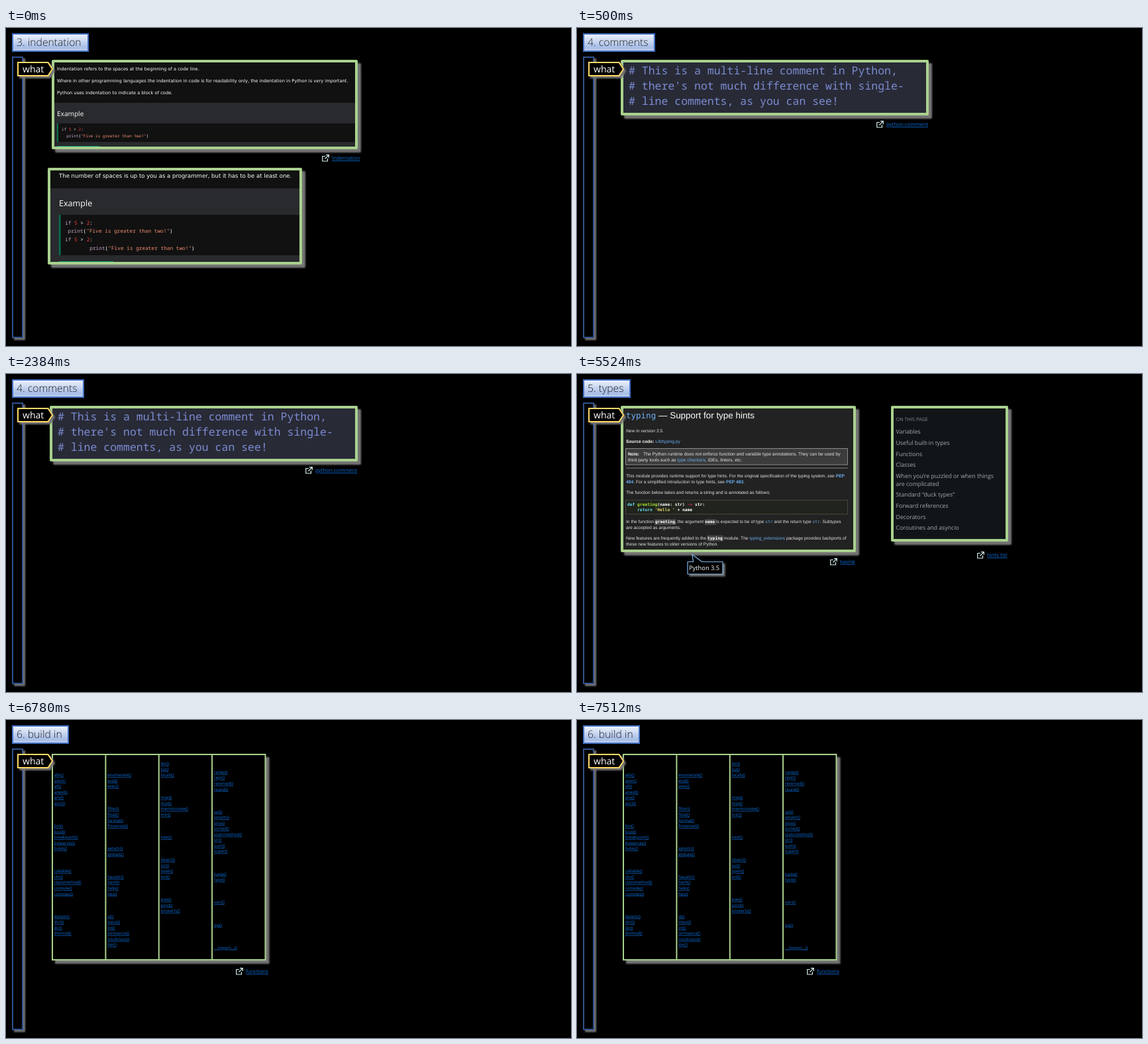
These frames come from a looping animation (853 px wide and 480 px high, 8000 ms). An HTML page:

```html
<!DOCTYPE html>
<html lang="en">
<head>
<meta charset="utf-8">
<style>
html, body { margin: 0; width: 100%; height: 100%; overflow: hidden; background: #000; }
svg { display: block; width: 853px; height: 480px; text-rendering: geometricPrecision; }
.ui { font-family: "Open Sans", "Noto Sans", sans-serif; }
.light { font-family: "Open Sans", "Noto Sans", sans-serif; font-weight: 300; }
.wide { font-family: "DejaVu Sans", sans-serif; }
.doc { font-family: "Liberation Sans", sans-serif; }
.mono { font-family: "Noto Sans Mono", monospace; }
.code { font-family: "DejaVu Sans Mono", monospace; }
.link { fill: #0a6fdc; text-decoration: underline; }
.deep { filter: drop-shadow(5.5px 5.5px 1.3px #747474); }
.near { filter: drop-shadow(3.5px 3.5px 1px #747474); }
</style>
</head>
<body>
<svg viewBox="0 0 853 480">
  <defs>
    <linearGradient id="sky" x2="0" y2="1">
      <stop stop-color="#f0f4fc"/>
      <stop offset=".74" stop-color="#abc0e8"/>
      <stop offset=".83" stop-color="#abc0e8"/>
      <stop offset="1" stop-color="#c7d5ed"/>
    </linearGradient>
  </defs>
  <rect class="near" x="10" y="44" width="15" height="423" stroke="#2f528f" stroke-width="2"/>
  <g id="slides"></g>
  <path class="near" d="M18 52H63.5L70 62 63.5 72H18Z" stroke="#ffd966" stroke-width="2"/>
  <text class="ui" x="25" y="67" font-size="14" fill="#fff">what</text>
</svg>
<script>
const GREEN = '#a9d18e', BLUE = '#6ab0f3';

const text = (font, size, x, y, content, fill = '#fff', extra = '') =>
  `<text class="${font}" font-size="${size}" x="${x}" y="${y}" fill="${fill}" ${extra}>${content}</text>`;
const span = (fill, content, extra = '') => `<tspan fill="${fill}" ${extra}>${content}</tspan>`;
const box = (x1, y1, x2, y2, fill, extra = '') =>
  `<rect x="${x1}" y="${y1}" width="${x2 - x1}" height="${y2 - y1}" fill="${fill}" ${extra}/>`;
// Dark card with a thick green frame; bounds are the outer edges.
const card = (x1, y1, x2, y2, fill) =>
  box(x1 + 2, y1 + 2, x2 - 2, y2 - 2, fill,
    `class="deep" stroke="${GREEN}" stroke-width="4" stroke-linejoin="round"`);
const title = (right, content) =>
  box(10, 9, right - 1, 35, 'url(#sky)', 'stroke="#4472c4" stroke-width="2"') +
  text('light', 15.7, 16, 27, content, '#222');
const link = (x, y, content) =>
  `<path transform="translate(${x - 15} ${y - 8})" d="M5 2.5H.8V10H8.500V6M6 .7H10.300V5M10.300 .7 4.500 6.500"
    fill="none" stroke="#d8f0f0" stroke-width="1.2"/>` + text('ui link', 7.8, x, y, content, '#0a6fdc');

function indentationSlide() {
  const test = span('#c5a5c5', 'if') + span('#ff3838', ' 5') + ' &gt; ' + span('#ff3838', '2') + ':';
  const print = span('#c5a5c5', 'print') + '(' + span('#f08d70', '"Five is greater than two!"') + ')';
  const mono = (size, x, y, content) => text('mono', size, x, y, content);
  const prose = (y, content) => text('wide', 6.72, 77, y, content);
  return title(125, '3. indentation') +
    card(69, 48, 531, 183, '#111') +
    box(73, 113, 527, 179, '#282a2d') +
    box(77, 144, 527, 172, '#111') + box(77, 144, 79, 172, '#08704c') +
    box(77, 178, 141, 179, '#08906c') +
    prose(64, 'Indentation refers to the spaces at the beginning of a code line.') +
    prose(82, 'Where in other programming languages the indentation in code is for readability only, ' +
      'the indentation in Python is very important.') +
    prose(100, 'Python uses indentation to indicate a block of code.') +
    text('ui', 10.1, 77, 133, 'Example') +
    mono(6.08, 84, 154.5, test) + mono(6.08, 91.3, 164.7, print) +
    link(492, 199, 'Indentation') +
    card(63, 211, 447, 357, '#111') +
    box(67, 242, 443, 353, '#282a2d') +
    box(80, 282, 443, 343, '#111') + box(80, 282, 82.5, 343, '#08704c') +
    box(80, 352, 162, 353, '#08906c') +
    text('wide', 8.56, 80, 225.7, 'The number of spaces is up to you as a programmer, but it has to be at least one.') +
    text('ui', 12.6, 80, 269, 'Example') +
    mono(7.77, 89, 296.5, test) + mono(7.77, 93.3, 309.3, print) +
    mono(7.77, 89, 322, test) + mono(7.77, 126.3, 334.7, print);
}

function commentsSlide() {
  const lines = ['This is a multi-line comment in Python,',
    "there's not much difference with single-", 'line comments, as you can see!'];
  return title(118, '4. comments') +
    card(66, 48, 531, 132, '#282a36') +
    lines.map((line, i) => text('mono', 16.5, 78, 70.3 + i * 22.8, '# ' + line, '#7b8bd0')).join('') +
    link(467, 148, 'python-comment');
}

function typesSlide() {
  const doc = (y, content, x = 74, size = 6.7, extra = '') => text('doc', size, x, y, content, '#e4e4e4', extra);
  const bold = content => span('#fff', content, 'font-weight="700"');
  const blue = (content, weight = 400) => span(BLUE, content, `font-weight="${weight}"`);
  const inline = (content, fill = '#fff', weight = 700) =>
    span(fill, content, `class="code" font-size="6.27" font-weight="${weight}"`);
  const toc = [[90, 'Variables'], [107, 'Useful built-in types'], [123.5, 'Functions'], [140, 'Classes'],
    [157, 'When you’re puzzled or when things'], [168.5, 'are complicated'], [185, 'Standard “duck types”'],
    [202, 'Forward references'], [219, 'Decorators'], [235.3, 'Coroutines and asyncio']];
  const code = (x, y, content) => text('code', 6.27, x, y, content, '#fff', 'font-weight="700"');
  return title(81, '5. types') +
    card(66, 48, 421, 269, '#222') +
    text('code', 12.5, 74, 67, 'typing', BLUE) +
    text('doc', 13.45, 123, 67, '— Support for type hints') +
    doc(87.5, 'New in version 3.5.', 74, 6.7, 'font-style="italic"') +
    doc(103.5, bold('Source code:') + ' ' + blue('Lib/typing.py')) +
    box(73.5, 112.5, 408.5, 137, '#3c3c3c', 'stroke="#8a8a8a"') +
    doc(122.5, bold('Note:'), 77) +
    doc(122.5, 'The Python runtime does not enforce function and variable type annotations. ' +
      'They can be used by', 100, 6.87) +
    doc(131.7, `third party tools such as ${blue('type checkers')}, IDEs, linters, etc.`, 77, 6.87) +
    box(74, 141.5, 409, 142.5, '#888') +
    doc(155.7, 'This module provides runtime support for type hints. For the original specification ' +
      'of the typing system, see ' + blue('PEP', 700)) +
    doc(165, `${blue('484', 700)}. For a simplified introduction to type hints, see ${blue('PEP 483', 700)}.`) +
    doc(181, 'The function below takes and returns a string and is annotated as follows:') +
    box(73.5, 190.5, 408.5, 211.5, '#20241c', 'stroke="#444"') +
    code(76, 199, `${span('#66d9ef', 'def')} ${span('#a6e22e', 'greeting')}(name: str) ` +
      `${span('#f92672', '-&gt;')} str:`) +
    code(91.1, 207, `${span('#66d9ef', 'return')} ${span('#e6db74', "'Hello '")} + name`) +
    box(117, 219, 149.5, 228, '#444') + box(193, 219, 210, 228, '#444') + box(196, 243.500, 221, 252.500, '#444') +
    doc(225, `In the function ${inline('greeting')}, the argument ${inline('name')} is expected to be of type ` +
      `${inline('str', BLUE, 400)} and the return type ${inline('str', BLUE, 400)}. Subtypes`) +
    doc(234.2, 'are accepted as arguments.') +
    doc(250, `New features are frequently added to the ${inline('typing')} module. The ` +
      `${blue('typing_extensions')} package provides backports of`) +
    doc(259.2, 'these new features to older versions of Python.') +
    '<path class="near" d="M167 283.500H175.500L174 272.500 188.500 283.500H220V302H167Z" stroke="#7db4e6" stroke-width="1.2"/>' +
    text('ui', 9.3, 169, 296, 'Python 3.5') +
    link(397, 286, 'typing') +
    card(474, 48, 651, 253, '#121518') +
    text('ui', 7.3, 481.5, 71, 'ON THIS PAGE', '#858a8e') +
    toc.map(([y, item]) => text('ui', 8.75, 481.5, y, item, '#a4a9ad')).join('') +
    link(619, 276, 'hints list');
}

function functionsSlide() {
  // Each column lists blocks as [first row, names].
  const columns = [
    [[0, 'abs aiter all anext any ascii'], [9, 'bin bool breakpoint bytearray bytes'],
      [17, 'callable chr classmethod compile complex'], [25, 'delattr dict dir divmod']],
    [[0, 'enumerate eval exec'], [6, 'filter float format frozenset'], [13, 'getattr globals'],
      [18, 'hasattr hash help hex'], [25, 'id input int isinstance issubclass iter']],
    [[-2, 'len list locals'], [4, 'map max memoryview min'], [11, 'next'],
      [15, 'object oct open ord'], [22, 'pow print property']],
    [[-0.5, 'range repr reversed round'], [6.5, 'set setattr slice sorted staticmethod str sum super'],
      [17.5, 'tuple type'], [22.5, 'vars'], [26.5, 'zip'], [30.5, '__import__']]
  ];
  const cells = columns.map((blocks, col) => blocks.map(([row, names]) =>
    names.split(' ').map((name, i) =>
      text('ui link', 6.25, 72.8 + col * 80.4, 85.2 + (row + i) * 8.54, name + '()', '#0a6fdc')
    ).join('')).join('')).join('');
  return title(95, '6. build in') +
    box(70, 52, 391.5, 362, '#000', `class="deep" stroke="${GREEN}" stroke-width="2"`) +
    `<path d="M150.400 52V362M230.800 52V362M311.100 52V362" stroke="${GREEN}" stroke-width="2"/>` +
    cells + link(362, 382, 'functions');
}

const slides = document.getElementById('slides');
slides.innerHTML = [indentationSlide, commentsSlide, typesSlide, functionsSlide]
  .map(make => `<g>${make()}</g>`).join('');

const LOOP = 8000, cuts = [500, 3640, 6780];
function draw() {
  const t = performance.now() % LOOP;
  const current = cuts.filter(cut => t >= cut).length;
  [...slides.children].forEach((slide, i) => { slide.style.display = i === current ? '' : 'none'; });
  requestAnimationFrame(draw);
}
draw();
</script>
</body>
</html>
```
